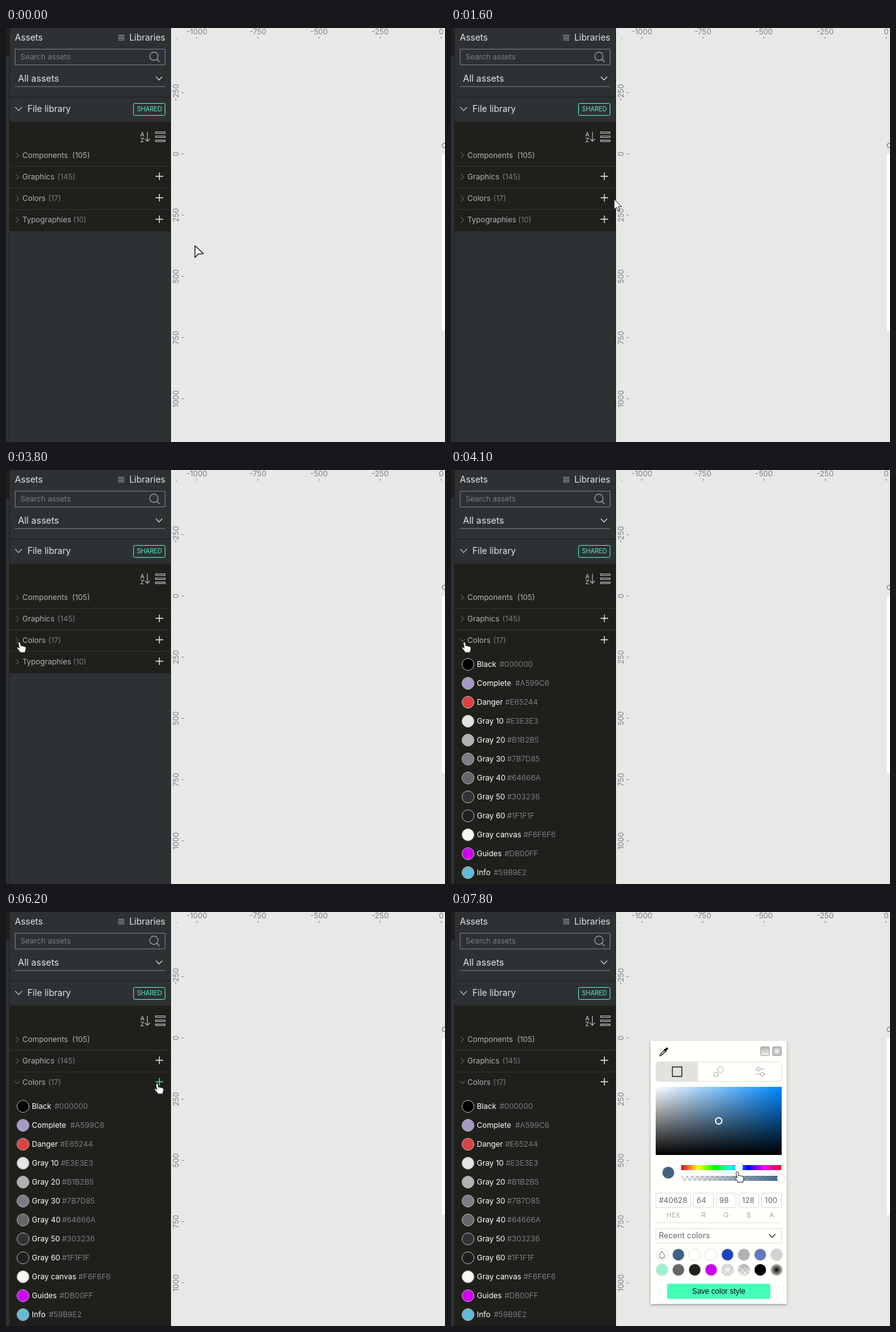
Recreate the animation shown at these times as an HTML page. Size 697 by 656 pixels, loop 8000 ms.

```html
<!DOCTYPE html>
<html lang="en">
<head>
<meta charset="utf-8">
<title>Assets panel</title>
<style>
html, body { margin: 0; width: 100%; height: 100%; overflow: hidden; background: #e7e9e6; }
svg { display: block; width: 697px; height: 656px; font-family: Inter, "Open Sans", sans-serif; font-size: 12px; }
text { white-space: pre; }
</style>
</head>
<body>
<svg id="stage" viewBox="0 0 697 656" xmlns="http://www.w3.org/2000/svg">
  <defs>
    <linearGradient id="sat"><stop stop-color="#fff"/><stop offset="1" stop-color="#08f"/></linearGradient>
    <linearGradient id="dark" x2="0" y2="1"><stop stop-opacity="0"/><stop offset="1"/></linearGradient>
    <linearGradient id="hue"></linearGradient>
    <linearGradient id="alpha"><stop stop-color="#406280" stop-opacity="0"/><stop offset="1" stop-color="#406280"/></linearGradient>
    <linearGradient id="lin" x2="0" y2="1"><stop stop-color="#b4b4b4"/><stop offset="1" stop-color="#f1f1ef"/></linearGradient>
    <radialGradient id="rad"><stop stop-color="#f6f6f4"/><stop offset="1" stop-color="#b8b8b8"/></radialGradient>
    <radialGradient id="spot"><stop/><stop offset="1" stop-color="#c4c4c2"/></radialGradient>
    <linearGradient id="fade" x2="0" y2="1"><stop stop-color="#b1b2b5"/><stop offset="1" stop-color="#b1b2b5" stop-opacity="0"/></linearGradient>
    <radialGradient id="halo"><stop stop-color="#fff"/><stop offset="1" stop-color="#b1b2b5" stop-opacity=".4"/></radialGradient>
    <pattern id="check" width="8" height="8" patternUnits="userSpaceOnUse" x="365" y="418">
      <path d="M0 0H8V8H0Z" fill="#fff"/><path d="M0 0H4V4H0ZM4 4H8V8H4Z" fill="#d9d9d9"/>
    </pattern>
    <filter id="shadow" x="-5%" y="-5%" width="110%" height="110%">
      <feDropShadow dx="0" dy="2" stdDeviation="2" flood-opacity=".3"/>
    </filter>
    <filter id="knob" x="-30%" y="-30%" width="160%" height="160%">
      <feDropShadow dx="0" dy="0" stdDeviation="1" flood-opacity=".45"/>
    </filter>
    <clipPath id="hexClip"><path d="M326 446H376V468H326Z"/></clipPath>
  </defs>

  <path d="M0 0H697V656H0Z" fill="#e7e9e6"/>
  <g id="rulers" fill="#7b7d85"></g>
  <path d="M692 200H697V480H692Z" fill="#fff"/>
  <text x="691.5" y="190" font-size="11" fill="#64666a">C</text>

  <path d="M0 0H262V656H0Z" fill="#2d3134"/>
  <path d="M0 0H5V45H0Z" fill="#1f1f1b"/>
  <path d="M5.5 0V656M261.5 0V656M6 109.5H261" stroke="#1d1e1e"/>

  <g fill="#e3e3e3" font-size="14">
    <text x="14" y="20">Assets</text>
    <text x="253" y="20" text-anchor="end">Libraries</text>
    <text x="19" y="85" font-size="14.5">All assets</text>
    <text x="34" y="133">File library</text>
  </g>
  <path d="M178 11.5H188M178 14H188M178 16.5H188M178 19H188" stroke="#a4a6a9"/>
  <path d="M14.5 33.5H252.5V58.5H14.5Z" fill="none" stroke="#7b7d85"/>
  <text x="23" y="50" fill="#7b7d85">Search assets</text>
  <g fill="none" stroke="#a0a2a6" stroke-width="1.2">
    <circle cx="234.8" cy="44.8" r="6.6"/><path d="M239.5 49.5L244 54"/>
    <path d="M14.5 125.2L20 130.8L25.5 125.2" stroke="#c4c5c7"/>
    <path d="M238 77.2L243 82.4L248 77.2" stroke="#e3e3e3"/>
    <path d="M14 92.8H252.5" stroke="#7b7d85" stroke-width="1"/>
  </g>
  <rect x="202.5" y="119.5" width="50" height="19" rx="2" fill="none" stroke="#5eecbd"/>
  <text x="227.7" y="132.3" font-size="9.8" text-anchor="middle" fill="#5eecbd">SHARED</text>

  <path id="list" fill="#1f1f1b"/>
  <g fill="#b1b2b5" font-size="9.5" font-weight="600">
    <text x="213" y="172">A</text><text x="213.3" y="181">Z</text>
  </g>
  <g fill="none" stroke="#b1b2b5" stroke-width="1.2">
    <path d="M224.5 164.5V179.5M220.5 175.5L224.5 179.7L228.5 175.5"/>
    <path d="M237.5 164.5H252.5V166.8H237.5ZM237.5 171H252.5V173.3H237.5ZM237.5 177.6H252.5V179.9H237.5Z"/>
  </g>
  <g id="rows"></g>
  <g id="colors"></g>

  <g id="picker">
    <path d="M317 204H533V621H317Z" fill="#fffffc" filter="url(#shadow)"/>
    <g transform="translate(331 214)">
      <path d="M.8 13.8L1.4 11.2L8 4.6L9.8 6.4L3.2 13Z" fill="#fff" stroke="#000" stroke-width="1.2"/>
      <path d="M7 3.6L8.2 2.6L9.2 3.6L11 1C12-.2 14.6 1.8 13.2 3.4L10.8 5.4L11.8 6.4L10.6 7.6Z"/>
    </g>
    <g stroke="#a4a4a4">
      <rect x="491.5" y="213.5" width="14" height="14" rx="2" fill="url(#lin)"/>
      <rect x="510.5" y="213.5" width="14" height="14" rx="2" fill="url(#rad)"/>
    </g>
    <path d="M329 238H392V268H329Q326 268 326 265V241Q326 238 329 238Z" fill="#e2e2df"/>
    <rect x="325.5" y="237.5" width="199" height="31" rx="4" fill="none" stroke="#e0e0de"/>
    <path d="M351.5 245.5H366.5V260.5H351.5Z" fill="none" stroke="#1f1f1f" stroke-width="1.4"/>
    <g fill="none" stroke="#b1b2b5" stroke-width="1.1">
      <circle cx="428" cy="249.8" r="4.5"/><circle cx="421" cy="257.5" r="3.5"/>
      <path d="M483 249H485.2M490.8 249H499M483 257H491.2M496.8 257H499"/>
      <circle cx="488" cy="249" r="2.8"/><circle cx="494" cy="257" r="2.8"/>
    </g>
    <path d="M325 277H525V385H325Z" fill="url(#sat)"/>
    <path d="M325 277H525V385H325Z" fill="url(#dark)"/>
    <circle cx="425" cy="331" r="5" fill="none" stroke="#fff" stroke-width="2"/>
    <circle cx="345" cy="413" r="9.5" fill="#406280" stroke="#d0d2d2" stroke-width=".6"/>
    <path d="M365.5 401H524.5V409H365.5Z" fill="url(#hue)"/>
    <path d="M365.5 418H524.5V426H365.5Z" fill="url(#check)"/>
    <path d="M365.5 418H524.5V426H365.5Z" fill="url(#alpha)"/>
    <g fill="#fff" filter="url(#knob)"><circle cx="457" cy="405" r="6.3"/><circle cx="524" cy="422" r="6.3"/></g>
    <g id="fields"></g>
    <path d="M325 492.5H525M325.5 501.5H524.5V524.5H325.5Z" fill="none" stroke="#e0e0de"/>
    <text x="330" y="517.4" font-size="12.5" fill="#64666a">Recent colors</text>
    <path d="M505 510.5L510 515.5L515 510.5" fill="none" stroke="#1f1f1f" stroke-width="1.2"/>
    <g id="recent"></g>
    <path d="M335 537.3C337 540.5 339 542.6 339 545A4 4 0 0 1 331 545C331 542.6 333 540.5 335 537.3Z" fill="none" stroke="#64666a"/>
    <rect x="343" y="589" width="164" height="24" rx="2" fill="#44ffb6"/>
    <text x="425" y="605" text-anchor="middle" fill="#111" font-family="Liberation Sans, Arial, sans-serif">Save color style</text>
  </g>

  <path id="cursor" fill="#fff" stroke="#1a1a1a" stroke-linejoin="round"/>
</svg>
<script>
const $ = id => document.getElementById(id);
const LOOP = 8000, STEP = 100, OPEN = 4100, PICK = 7000;
const label = (x, y, s, extra = "") => `<text x="${x}" y="${y}" ${extra}>${s}</text>`;
const disc = (x, y, fill, stroke) => `<circle cx="${x}" cy="${y}" r="9.5" fill="${fill}" stroke="${stroke}"/>`;

// Rulers
let html = '<circle cx="270.5" cy="17" r=".7"/>';
for (let i = 0; i < 5; i++) {
  const x = 303 + 97 * i;
  html += label(x, 10, -1000 + 250 * i, 'text-anchor="middle"') + `<path d="M${x - .5} 14h1v3h-1Z"/>`;
}
for (let i = 0; i < 6; i++) {
  const y = 102.3 + 97.1 * i;
  html += label(0, 0, -250 + 250 * i, `text-anchor="middle" transform="translate(274.3 ${y}) rotate(-90)"`)
    + `<path d="M279 ${Math.floor(y)}h3v1h-3Z"/>`;
}
$("rulers").innerHTML = html;

// Asset groups: name, count, x of the count
const groups = [["Components", 105, 105], ["Graphics", 145, 81.5], ["Colors", 17, 67], ["Typographies", 10, 106.5]];
$("rows").innerHTML = groups.map(([name, n, x], i) => {
  const y = 202 + 34 * i;
  const line = i ? `<path d="M6 ${y - 16.5}H261" stroke="#303236"/>` : "";
  const plus = i ? `<path id="plus${i}" d="M237.5 ${y - 1}h12m-6-6v12" stroke-width="1.3"/>` : "";
  return `<g id="row${i}">${line}<path id="arrow${i}" d="M15.8 ${y - 4.5}l4.4 4.5l-4.4 4.5" fill="none" stroke="#7b7d85"/>`
    + label(26, y + 4.2, name, 'fill="#b1b2b5"')
    + label(x, y + 4.2, `(${n})`, `fill="${i ? "#7b7d85" : "#b1b2b5"}"`) + plus + "</g>";
}).join("");

// Library colours: name, code, x of the code, shown fill when it differs
const library = [
  ["Black", "000000", 77], ["Complete", "A599C6", 102], ["Danger", "E65244", 86, "#dc4343"],
  ["Gray 10", "E3E3E3", 87], ["Gray 20", "B1B2B5", 89, "#b1b1b0"], ["Gray 30", "7B7D85", 89],
  ["Gray 40", "64666A", 89], ["Gray 50", "303236", 89], ["Gray 60", "1F1F1F", 89],
  ["Gray canvas", "F6F6F6", 115, "#f8f8f3"], ["Guides", "DB00FF", 85, "#cf00f2"], ["Info", "59B9E2", 68, "#61bad7"]
];
$("colors").innerHTML = library.map(([name, code, x, fill], i) => {
  const y = 308 + 30 * i;
  return disc(27, y, fill || "#" + code, "#b1b2b5")
    + label(41, y + 4.2, name, 'fill="#fff"') + label(x, y + 4.2, "#" + code, 'fill="#7b7d85"');
}).join("");

// Picker parts
$("hue").innerHTML = ["#e8002a", "#ff0", "#0f0", "#0ff", "#00f", "#f0f", "#e8002a"]
  .map((c, i) => `<stop offset="${i / 6}" stop-color="${c}"/>`).join("");
$("fields").innerHTML = [["HEX", "#406280"], ["R", 64], ["G", 98], ["B", 128], ["A", 100]].map(([name, v], i) => {
  const x = i ? 349 + 36 * i : 325, w = i ? 31 : 55;
  return `<rect x="${x + .5}" y="445.5" width="${w}" height="23" rx="1" fill="none" stroke="#dcdcda"/>`
    + label(x + 5, 461.2, v, 'fill="#64666a"' + (i ? "" : ' clip-path="url(#hexClip)"'))
    + label(x + w / 2 + .5, 484, name, 'font-size="10.5" text-anchor="middle" fill="#a4a5a8"');
}).join("");
const recent = ["#fffffc", "#406280", "#fffffc", "#fffffc", "#1c46b6", "#b1b1b1", "#6479ba", "#d3d3d3",
  "#9df1d1", "#64666a", "#20201c", "#cd00f0", "url(#halo)", "url(#fade)", "#000", "url(#spot)"];
$("recent").innerHTML = recent.map((c, i) => {
  const x = 335 + 26 * (i % 8), y = i < 8 ? 543 : 567;
  return (i == 12 || i == 13 ? disc(x, y, "url(#check)", "none") : "") + disc(x, y, c, "#dededb");
}).join("");

// Pointer tip: time, x, y, bow of the path
const path = [
  [0, 300, 345], [200, 309, 336], [300, 310, 326], [800, 242, 232], [1100, 242, 232], [1400, 259, 267],
  [1500, 259, 267], [1600, 259, 271], [1700, 259, 271], [1900, 253, 271], [2000, 253, 271], [2300, 242, 271],
  [2800, 242, 271], [3600, 21, 273, 17], [3700, 21, 273], [3800, 20, 273], [4800, 20, 273], [5600, 229, 272, 1],
  [5700, 229, 272], [5800, 247, 270], [5900, 233, 270], [6000, 233, 270], [6100, 229, 271], [6200, 238.5, 272],
  [7100, 238.5, 272], [7200, 320, 330], [7400, 474, 427], [7500, 474, 427], [7600, 495, 541], [7700, 432, 440],
  [7800, 453, 412], [LOOP, 453, 412]
];
const shapes = {
  canvas: "M0 0V18.6L5.2 13.2L13.3 12.6Z",
  arrow: "M0 0V16.5L3.8 13L6.4 19L9 18L6.5 12H11.5Z",
  hand: "M.5 0C1.6-.6 2.6 0 2.8 1L3.9 6C5 5 6.3 5.4 6.6 6.3C7.8 5.6 8.9 6.2 9.2 7C10.3 6.6 11.6 7.2 11.7 8.6"
    + "C12 11 11.4 12.8 10.6 14.2V16.2H1.8V14.6C.5 13-1.6 11-2.6 9.2C-3 8-1.6 7.3-.4 8.2L1 9.4L-.5 1.5Q-.5.3.5 0Z"
};

function tipAt(t) {
  const i = Math.max(1, path.findIndex(k => k[0] >= t));
  const [t0, x0, y0] = path[i - 1], [t1, x1, y1, bow = 0] = path[i];
  let u = (t - t0) / (t1 - t0);
  if (t1 - t0 >= 500) u = u * u * (3 - 2 * u);
  return [x0 + (x1 - x0) * u, y0 + (y1 - y0) * u + bow * Math.sin(Math.PI * u)];
}

const show = (id, on) => $(id).setAttribute("display", on ? "inline" : "none");

function draw(ms) {
  const t = Math.floor(ms % LOOP / STEP) * STEP;
  const open = t >= OPEN, pick = t >= PICK;
  const [x, y] = tipAt(t);
  const kind = x < 250 || pick && x > 316 ? "hand" : x > 262 ? "canvas" : "arrow";

  $("list").setAttribute("d", `M6 148.5H261V${open ? 656 : 322}H6Z`);
  $("arrow2").setAttribute("d", open ? "M14 268l4 4l4-4" : "M15.8 265.5l4.4 4.5l-4.4 4.5");
  show("row3", !open);
  show("colors", open);
  show("picker", pick);
  for (let i = 1; i < 4; i++) {
    const hover = x > 236 && x < 250 && Math.abs(y - 202 - 34 * i) < 10;
    $("plus" + i).setAttribute("stroke", hover ? "#31efb8" : "#e8e8e8");
  }
  const cursor = $("cursor");
  cursor.setAttribute("d", shapes[kind]);
  cursor.setAttribute("stroke-width", kind == "canvas" ? 1.4 : 1);
  cursor.setAttribute("transform", `translate(${x.toFixed(1)} ${y.toFixed(1)})`);
}

let start;
function tick(now) {
  start ??= now;
  draw(now - start);
  requestAnimationFrame(tick);
}
draw(0);
requestAnimationFrame(tick);
</script>
</body>
</html>
```
